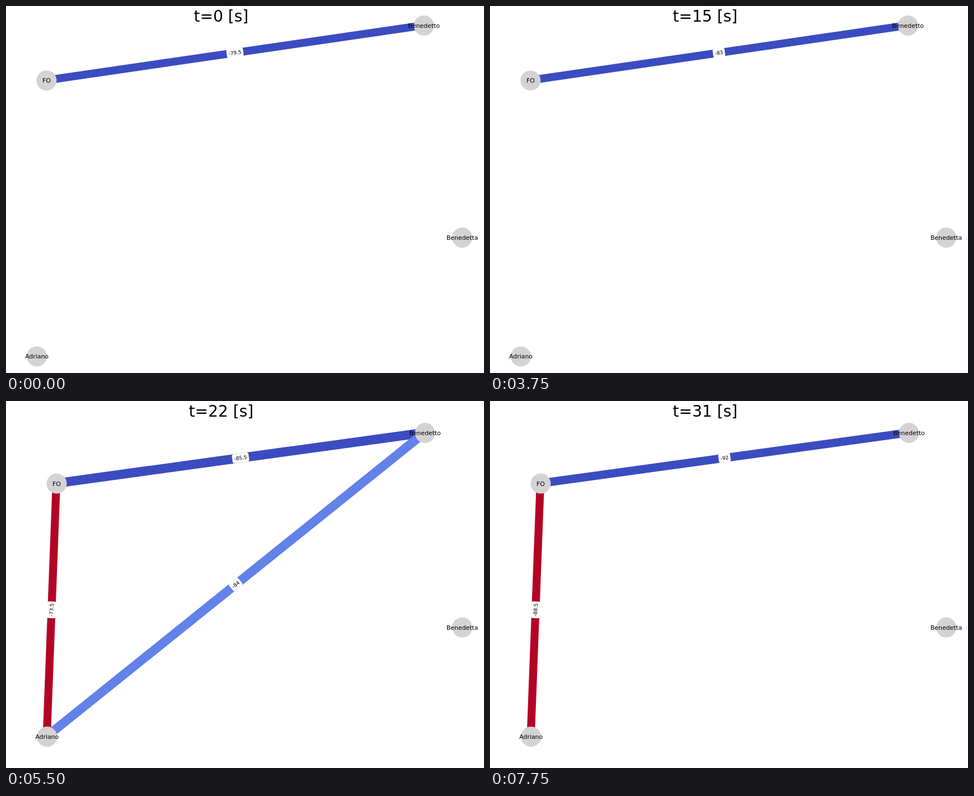
These frames come from a looping animation (853x656 px, 8000 ms). An HTML page:

```html
<!DOCTYPE html>
<html lang="en">
<head>
<meta charset="utf-8">
<title>Signal graph</title>
<style>
  html, body { margin: 0; width: 100%; height: 100%; overflow: hidden; background: #fff; }
  svg { display: block; width: 853px; height: 656px; }
  text { font-family: "DejaVu Sans", sans-serif; text-anchor: middle; fill: #000; }
  .title { font-size: 28px; }
  .name { font-size: 10.9px; }
  .value { font-size: 9px; }
  .node { fill: #d3d3d3; }
  .tag { fill: #fff; stroke: #fff; stroke-width: 0.9; }
</style>
</head>
<body>
<svg id="stage" viewBox="0 0 853 656"></svg>
<script>
const STEP = 250;
const THIN = 14.2;
const stage = document.getElementById('stage');
const names = { a: 'FO', b: 'Benedetto', c: 'Benedetta', d: 'Adriano' };

// The axes shrink as soon as an edge reaches node d.
const wide = { a: [72.3, 133.2], b: [745.8, 35], c: [814.2, 414], d: [55, 626.4] };
const tight = { a: [90.4, 147.6], b: [747.7, 57], c: [814.2, 404.8], d: [73.2, 600] };

// Edge values for each second.
const steps = [
  { ab: -79.5 }, { ab: -80.5 }, { ab: -82 }, {}, { ab: -81.5 }, { ab: -82 },
  { ab: -82.67 }, { ab: -83 }, {}, { ab: -84 }, { ab: -83.7 }, { ab: -83.5 },
  { ab: -84 }, { ab: -84.5, da: -82 }, { ab: -83.5 }, { ab: -83 },
  { ab: -86, da: -83 }, { ab: -87.5, da: -84 }, { ab: -88.5, da: -84, db: -86.5 },
  { ab: -89.33, da: -84.5, db: -87 }, { ab: -88, da: -80.5, db: -86 },
  { ab: -87, da: -76, db: -85 }, { ab: -85.5, da: -73.5, db: -84 },
  { ab: -84, da: -71.25, db: -83 }, { ab: -83, da: -69.12, db: -82.5 },
  { ab: -84, da: -77.5, db: -86.5 }, { ab: -85, db: -89 }, { ab: -86, db: -90.83 },
  { ab: -87, db: -91 }, { da: -88, dc: -91.5 }, { da: -88 }, { ab: -92, da: -88.5 }
];

const ramp = [
  [59, 76, 192], [98, 130, 234], [141, 176, 254], [192, 212, 245], [221, 220, 220],
  [242, 203, 183], [244, 152, 122], [217, 88, 70], [180, 4, 38]
];

function coolwarm(v) {
  const x = v * (ramp.length - 1), i = Math.min(ramp.length - 2, Math.floor(x));
  return `rgb(${ramp[i].map((c, k) => Math.round(c + (ramp[i + 1][k] - c) * (x - i)))})`;
}

function add(parent, tag, attrs, text) {
  const el = document.createElementNS('http://www.w3.org/2000/svg', tag);
  for (const k in attrs) el.setAttribute(k, attrs[k]);
  if (text !== undefined) el.textContent = text;
  return parent.appendChild(el);
}

function addTag(parent, [x1, y1], [x2, y2], value) {
  const angle = Math.atan2(y2 - y1, x2 - x1) * 180 / Math.PI;
  const g = add(parent, 'g', {
    transform: `translate(${(x1 + x2) / 2} ${(y1 + y2) / 2}) rotate(${angle})`
  });
  const box = add(g, 'rect', { class: 'tag', y: -7.8, height: 15.6, rx: 2.7 });
  const w = add(g, 'text', { class: 'value', y: 3.1 }, value).getComputedTextLength() + 5.6;
  box.setAttribute('x', -w / 2);
  box.setAttribute('width', w);
}

function draw(n) {
  const edges = Object.entries(steps[n]);
  const pos = edges.some(([key]) => key[0] === 'd') ? tight : wide;
  const values = edges.map(e => e[1]);
  const low = Math.min(...values), high = Math.max(...values), span = high - low || 1;

  stage.replaceChildren();
  // Edges and their tags sit half a pixel up and left of the nodes.
  const layer = () => add(stage, 'g', { transform: 'translate(-0.5 -0.5)' });

  const lines = layer();
  for (const [key, value] of edges) {
    const [x1, y1] = pos[key[0]], [x2, y2] = pos[key[1]];
    add(lines, 'line', {
      x1, y1, x2, y2,
      stroke: coolwarm((value - low) / span),
      'stroke-width': THIN * value / high
    });
  }
  for (const k in pos) add(stage, 'circle', { class: 'node', cx: pos[k][0], cy: pos[k][1], r: 18 });
  for (const k in pos) add(stage, 'text', { class: 'name', x: pos[k][0], y: pos[k][1] + 3.9 }, names[k]);
  const tags = layer();
  for (const [key, value] of edges) addTag(tags, pos[key[0]], pos[key[1]], value);
  add(stage, 'text', { class: 'title', x: 384, y: 28 }, `t=${n} [s]`);
}

let shown = -1;
function tick() {
  const n = Math.floor(performance.now() / STEP) % steps.length;
  if (n !== shown) draw(shown = n);
  requestAnimationFrame(tick);
}
tick();
</script>
</body>
</html>
```
